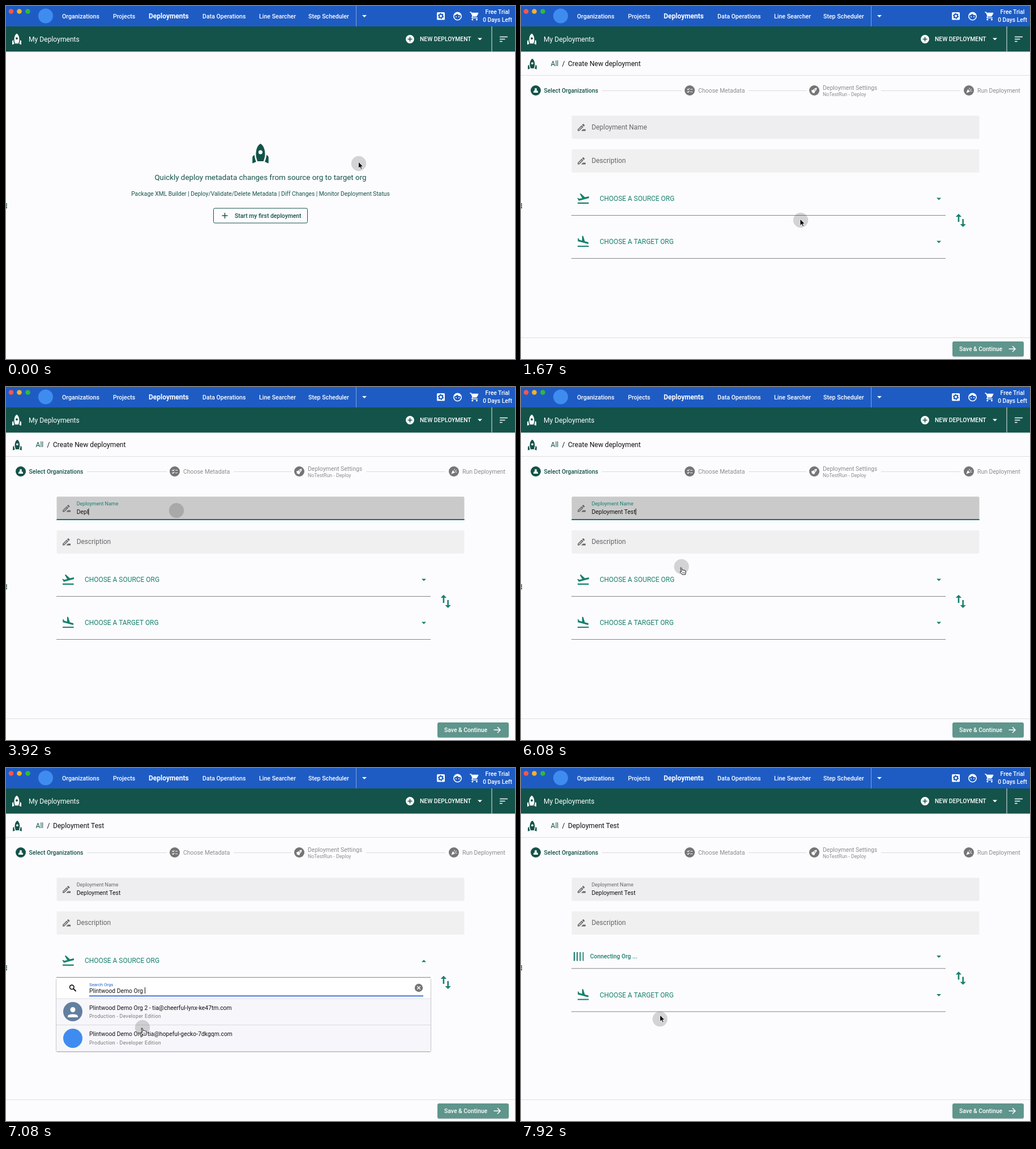
Write an HTML page that moves like this. It is 899 px wide and 623 px high and loops after 8 s.

```html
<!DOCTYPE html>
<html lang="en">
<head>
<meta charset="utf-8">
<title>My Deployments</title>
<style>
html, body { margin: 0; width: 100%; height: 100%; overflow: hidden; background: #fcfcfe; }
svg { display: block; width: 899px; height: 623px; }
text { font-family: Roboto, "Noto Sans", sans-serif; white-space: pre; }
</style>
</head>
<body>
<svg id="stage" viewBox="0 0 899 623" xmlns="http://www.w3.org/2000/svg"></svg>
<script>
const LOOP = 8000, TICK = 1000 / 12;
const DARK = '#14534a', GREEN = '#17806e', GREY = '#757575', PALE = '#8c8c8c', BLUE = '#1e5cc4', BADGE = '#3f8cf0';

// Markup helpers
const text = (x, y, str, size, fill, weight = 400, more = '') =>
  `<text x="${x}" y="${y}" font-size="${size}" fill="${fill}" font-weight="${weight}" ${more}>${str}</text>`;
const rect = (x, y, w, h, fill, more = '') =>
  `<rect x="${x}" y="${y}" width="${w}" height="${h}" fill="${fill}" ${more}/>`;
const dot = (x, y, r, fill, more = '') => `<circle cx="${x}" cy="${y}" r="${r}" fill="${fill}" ${more}/>`;
const stroke = (d, color, w = 1, more = '') =>
  `<path d="${d}" fill="none" stroke="${color}" stroke-width="${w}" ${more}/>`;
const icon = (d, x, y, s, fill) =>
  `<path d="${d}" transform="translate(${x} ${y}) scale(${s})" fill="${fill}"/>`;
const group = (id, body, more = '') => `<g id="${id}" ${more}>${body}</g>`;
const drop = (x, y, fill, id = '') =>
  `<path ${id && `id="${id}"`} d="M-4 -2H4L0 2Z" transform="translate(${x} ${y})" fill="${fill}"/>`;

const ROCKET = 'M12 2.5s4.5 2 4.5 10.5c0 2.5-1 5.6-1.6 7H9.100c-.6-1.400-1.600-4.500-1.600-7C7.500 4.500 12 2.500 12 2.500zm2 8.500a2 2 0 1 0-4 0 2 2 0 1 0 4 0zm-6.300 9.500c-.5-1.200-1.500-4.200-1.700-6.900l-1.100.8Q4 15 4 16.100V22zM20 22v-5.900Q20 15 19.100 14.400l-1.100-.8c-.2 2.700-1.200 5.700-1.700 6.900z';
const CART = 'M7 18a2 2 0 1 0 .01 0zM1 2v2h2l3.600 7.600-1.350 2.450C4.500 15.400 5.500 17 7 17h12v-2H7.400q-.3 0-.2-.4l.9-1.600h7.450q1.200 0 1.750-1L20.900 5.500Q21.300 4 20 4H5.200l-.9-2zm16 16a2 2 0 1 0 .01 0z';
const PEN = 'M15 16l-4 4h10v-4zM12.060 7.200L3 16.250V20h3.750l9.060-9.060zM5.900 18H5v-.9l7.060-7.060.9.9zM18.700 8q.6-.7 0-1.400l-2.300-2.300q-.7-.6-1.400 0l-1.850 1.800 3.750 3.750z';
const TAKEOFF = 'M2.500 19h19v2h-19zM22.070 9.640c-.2-.8-1-1.300-1.840-1.060L14.900 10 8 3.570l-1.900.5 4.140 7.170-5 1.340-1.970-1.540-1.450.4 2.600 4.480L21 11.500q1.300-.6 1.070-1.860z';
const LAND = 'M2.500 19h19v2h-19zM9.700 13.270l9.650 2.580c.8.2 1.600-.3 1.840-1.060.2-.8-.3-1.600-1.060-1.840l-5.300-1.420L12.060 2.500 10.120 2v8.280L5.150 8.950l-.93-2.320-1.450-.4v5.170z';
const SWAP = 'M16 17V10h-2v7h-3l4 4 4-4zM9 3L5 7h3v7h2V7h3z';

const person = (x, y, s) => dot(x, y - 3 * s, 3 * s, '#fff') +
  `<path d="M${x - 6 * s} ${y + 5 * s}q0 -4 ${6 * s} -4t${6 * s} 4v${s}h${-12 * s}z" fill="#fff"/>`;

const topBar = () => rect(0, 0, 899, 36, BLUE) +
  dot(9, 9.5, 4.3, '#fc5650') + dot(23.5, 9.5, 4.3, '#f6b02c') + dot(38.500, 9.5, 4.3, '#30b93c') +
  dot(70, 17.5, 13, BADGE) +
  text(99, 21.7, 'Organizations', 10.6, '#fff', 500) +
  text(189, 21.7, 'Projects', 10.6, '#fff', 500) +
  text(252, 21.7, 'Deployments', 12, '#fff', 700) +
  text(347, 21.7, 'Data Operations', 10.6, '#fff', 500) +
  text(447, 21.7, 'Line Searcher', 10.6, '#fff', 500) +
  text(534, 21.7, 'Step Scheduler', 10.6, '#fff', 500) +
  rect(618, 0, 1, 36, '#7fa3de') + drop(633, 18, '#fff') +
  rect(761, 11, 14, 13.500, '#fff', 'rx="1.6"') +
  dot(768, 17.7, 3.1, 'none', `stroke="${BLUE}" stroke-width="2"`) +
  dot(768, 17.7, 4.5, 'none', `stroke="${BLUE}" stroke-width="1.4" stroke-dasharray="2.2 2.51"`) +
  dot(797.5, 18, 6.7, 'none', 'stroke="#fff" stroke-width="1.6"') +
  `<path d="M791.500 16.500q4 -.5 5 -3q3 3.500 7.500 2.500q-1.500 -5 -6.500 -5t-6 5.500z" fill="#fff"/>` +
  dot(795, 19, 1, '#fff') + dot(800, 19, 1, '#fff') +
  icon(CART, 818.500, 8.8, .76, '#fff') +
  text(868, 14, 'Free Trial', 10.3, '#fff', 500, 'text-anchor="middle"') +
  text(868, 27.8, '0 Days Left', 10.3, '#fff', 500, 'text-anchor="middle"');

const subBar = () => rect(0, 36, 899, 44.5, DARK) +
  icon(ROCKET, 7, 46.3, 1, '#fff') +
  text(40, 62.8, 'My Deployments', 12.1, '#fff') +
  dot(713.5, 58.500, 7.4, '#fff') + stroke('M709.5 58.500h8M713.5 54.500v8', DARK, 1.6) +
  text(731, 62.2, 'NEW DEPLOYMENT', 10.3, '#fff', 500) +
  drop(837, 58.500, '#fff') + rect(857.500, 36, 1, 44.5, '#e4ecea') +
  stroke('M872 54.500h14M872 58.500h9.500M872 62.500h4.700', '#fff', 1.5);

const home = () => icon(ROCKET, 428.100, 238.500, 1.78, DARK) +
  text(449.5, 306.5, 'Quickly deploy metadata changes from source org to target org', 13.37, DARK, 400, 'text-anchor="middle"') +
  text(449.5, 334.6, 'Package XML Builder | Deploy/Validate/Delete Metadata | Diff Changes | Monitor Deployment Status',
    10.3, DARK, 400, 'text-anchor="middle"') +
  rect(366.5, 357, 166, 26, DARK, `id="startFill" rx="2.5"`) +
  rect(366.5, 357, 166, 26, 'none', `rx="2.5" stroke="${DARK}"`) +
  stroke('M381.500 370h10M386.5 365v10', DARK, 1.4) +
  text(404, 373.8, 'Start my first deployment', 10.37, DARK, 500);

const steps = () => dot(26, 149, 9, DARK) + person(26, 149, .68) +
  text(40.5, 153, 'Select Organizations', 10.34, DARK, 500) +
  rect(143, 149, 141, 1, '#d9d9db') + rect(402, 149, 102, 1, '#d9d9db') + rect(636, 149, 140, 1, '#d9d9db') +
  [298, 518, 791].map(x => dot(x, 149, 9, GREY)).join('') +
  stroke('M293.500 146.500l1.500 1.500 2.500 -2.500M293.500 151l1.500 1.500 2.500 -2.500M299 147h4M299 151.500h4', '#fff', 1.1) +
  `<path d="M522.500 144.500q-4 0 -6.500 3.500l-2.500 .5 -.8 1.500 4.300 4.300 1.500 -.8 .5 -2.500q3.500 -2.500 3.500 -6.500zM513.500 153.500l.5 -2 1.500 1.500z" fill="#fff"/>` +
  dot(519, 148, 1, GREY) +
  `<path d="M786.500 153.500l2.500 -6.500 4 4z" fill="#fff"/>` +
  stroke('M791 147.500q2 -1 1 -3M793 149l3 -3M793.500 150.500q1.500 -1.500 3 0', '#fff', 1) +
  text(313, 153, 'Choose Metadata', 10.44, PALE) +
  text(533, 147.900, 'Deployment Settings', 10.44, PALE) +
  text(533, 158.800, 'NoTestRun - Deploy', 8.78, PALE) +
  text(806, 153, 'Run Deployment', 10.44, PALE);

const form = () => icon(ROCKET, 8.3, 90.500, .97, DARK) +
  text(52.500, 105.600, 'All', 12.1, DARK) + text(72.500, 105.600, '/', 12.1, '#111') +
  text(83, 105.600, '', 12.1, '#111', 400, 'id="crumb"') +
  rect(0, 122, 899, 1, '#dfdfe1') + steps() +
  rect(89.5, 193.5, 720, 41, '#000', 'id="nameBg" rx="2"') +
  rect(89.5, 234, 720, 1, '#555', 'id="nameEdge"') +
  rect(89.5, 233, 720, 2, '#0f7666', 'id="nameLine"') +
  icon(PEN, 97.700, 205, .78, '#666') +
  text(0, 0, 'Deployment Name', 11.9, GREY, 400, 'id="label"') +
  text(124.700, 223.900, '', 10.42, '#111', 400, 'id="typed"') +
  rect(125, 214.500, 1, 11.500, '#111', 'id="caret"') +
  rect(89.5, 253, 720, 41, '#f0f0f1', 'rx="2"') +
  icon(PEN, 97.700, 264, .78, '#666') +
  text(124.700, 277.100, 'Description', 11.96, '#666') +
  group('sourceRow', icon(TAKEOFF, 97.5, 327.300, 1.03, GREEN) +
    text(139, 344.200, 'CHOOSE A SOURCE ORG', 11.96, GREEN) +
    rect(89, 369, 661, 1, '#858585') + drop(738, 340.500, GREEN, 'sourceDrop')) +
  group('busyRow', [0, 1, 2, 3].map(i => rect(93 + i * 5.2, 325, 2.2, 15.5, GREEN, 'class="bar"')).join('') +
    text(122, 336.200, 'Connecting Org ...', 10.37, GREEN, 500) +
    rect(89, 353.300, 661, 1, '#858585') + drop(738, 333, GREEN)) +
  group('targetRow', icon(LAND, 97.5, 403.400, 1.03, GREEN) +
    text(139, 420.200, 'CHOOSE A TARGET ORG', 11.96, GREEN) +
    rect(89, 445, 661, 1, '#858585') + drop(738, 416.500, GREEN)) +
  group('swap', icon(SWAP, 761.300, 363, 1.29, GREEN)) +
  rect(0, 585, 899, 1, '#dfdfe1') +
  rect(762, 592.800, 126, 27, '#000', 'rx="3" opacity=".16"') + rect(762, 592, 126, 26.500, '#5f958c', 'rx="3"') +
  text(774, 609.100, 'Save &amp; Continue', 10.4, '#fff', 500) +
  stroke('M861.500 605.300h11M868 600.300l5 5 -5 5', '#fff', 1.5);

const org = (y, name, mail) => text(147, y, `${name} - ${mail}`, 10.37, '#111') +
  text(147, y + 14.400, 'Production - Developer Edition', 8.85, '#777', 400, 'letter-spacing=".29"');

const menu = () => rect(88, 371, 663, 131, '#000', 'rx="3" opacity=".12"') +
  rect(88.500, 371, 662, 130, '#000', 'rx="3" opacity=".2"') +
  rect(89, 370, 661, 130, '#fff', 'rx="2"') + rect(89, 369, 661, 1, '#858585') +
  rect(89, 407, 661, 93, '#f7f7fb') +
  rect(89, 406.500, 661, 1, '#e0e0e4') + rect(89, 453, 661, 1, '#dadade') +
  dot(116.300, 386.800, 3.700, 'none', 'stroke="#111" stroke-width="1.6"') + stroke('M119 389.500l4.500 4.500', '#111', 1.9) +
  text(147, 384.900, 'Search Orgs', 7.83, '#1d5fd0') +
  text(147, 396.500, 'Plintwood Demo Org ', 10.37, '#111', 400, 'id="query"') +
  rect(246.500, 387, 1, 11, '#111', 'id="queryCaret"') +
  rect(147, 401.500, 590, 1.7, '#1d5fd0') +
  dot(729, 388, 7.2, GREY) + stroke('M726.200 385.200l5.600 5.600M731.800 385.200l-5.600 5.600', '#fff', 1.4) +
  dot(118, 430, 17, '#627f9f') + person(118, 431, 1.5) +
  org(426.700, 'Plintwood Demo Org 2', 'tia@cheerful-lynx-ke47tm.com') +
  dot(118, 477, 17, BADGE) +
  org(473.300, 'Plintwood Demo Org', 'tia@hopeful-gecko-7dkgqm.com');

const pointers = () => dot(0, 0, 13.200, '#000', 'id="halo" opacity=".16"') +
  group('arrow', `<path d="M0 0V11.500L2.700 9 4.600 13 6.500 12.200 4.700 8.400H8.200Z" fill="#000" stroke="#fff" stroke-width=".8"/>`) +
  group('hand', `<path d="M0 1.200Q.9 -.6 2 1.200L3.400 5.200Q4.600 4.300 5.500 5.400 6.700 4.700 7.500 5.900 9.200 5.500 9.400 7.500 9.800 10 8.700 13H3.200Q1.800 10.500 -.8 8.400 -.5 6.600 2 8Z" fill="#fff" stroke="#111" stroke-width="1"/>` +
    stroke('M4 8.500v2.500M5.700 8.500v2.500M7.300 8.500v2.500', '#111', .6)) +
  group('beam', stroke('M-2.300 -5.500Q0 -5.500 0 -4Q0 -5.500 2.300 -5.500M0 -4V4M-2.300 5.500Q0 5.500 0 4Q0 5.500 2.300 5.500M-1.300 1.500h2.600', '#111', 1.1));

const stage = document.getElementById('stage');
stage.innerHTML = rect(0, 0, 899, 623, '#fcfcfe') + group('home', home()) + group('form', form()) +
  [349.500, 352.700, 356].map(y => rect(0, y - 1, 1.800, 2, '#123a34')).join('') +
  topBar() + subBar() + group('menu', menu()) + pointers();

const el = {};
stage.querySelectorAll('[id]').forEach(n => el[n.id] = n);
const bars = [...stage.querySelectorAll('.bar')];
const set = (n, k, v) => n.setAttribute(k, v);
const show = (n, on) => set(n, 'display', on ? 'inline' : 'none');

const ease = p => { p = Math.min(1, Math.max(0, p)); return p * p * (3 - 2 * p); };
const ramp = (t, from, len) => ease((t - from) / len);

// Key points: time, x, y
const TIP = [[250, 622.5, 275], [830, 493, 376], [1750, 493, 376], [2330, 302, 218], [5830, 302, 218],
  [6080, 281.500, 318], [6250, 276, 338], [6670, 276, 338], [7080, 239, 458.500], [7330, 240, 470],
  [7580, 240, 470], [7920, 245.500, 436]];
const HALO = [[250, 623, 278], [830, 494, 378], [1750, 494, 378], [2400, 301, 218], [5830, 301, 218],
  [6080, 283.500, 317], [6330, 277, 338], [6670, 277, 338], [7080, 241, 458], [7400, 241, 470],
  [7580, 241, 470], [8000, 246, 440]];
const along = (keys, t) => {
  let i = keys.findIndex(k => k[0] > t);
  if (i < 0) i = keys.length;
  const a = keys[Math.max(0, i - 1)], b = keys[Math.min(keys.length - 1, i)];
  const p = b === a ? 0 : ease((t - a[0]) / (b[0] - a[0]));
  return [a[1] + (b[1] - a[1]) * p, a[2] + (b[2] - a[2]) * p];
};

const TYPED = 'Deployment Test';
const KEYS = [[3080, 1], [3500, 2], [3750, 3], [3920, 4], [4170, 6], [4500, 8], [4750, 9], [4830, 11], [5330, 13], [5580, 15]];

function drawForm(t) {
  const focus = ramp(t, 2365, 360), blur = ramp(t, 6290, 360);
  const hover = ramp(t, 2180, 220) * (1 - blur), lit = focus * (1 - blur);
  const active = t > 2365 && t < 6290;
  el.crumb.textContent = t < 6290 ? 'Create New deployment' : TYPED;
  set(el.nameBg, 'opacity', .055 + .08 * hover + .065 * lit);
  set(el.nameEdge, 'opacity', hover);
  set(el.nameLine, 'x', 449.5 - 360 * focus);
  set(el.nameLine, 'width', 720 * focus);
  set(el.nameLine, 'opacity', 1 - blur);
  set(el.label, 'transform', `translate(124.700 ${217.800 - 8.700 * focus}) scale(${1 - .245 * focus})`);
  set(el.label, 'fill', active ? GREEN : '#666');

  const count = KEYS.reduce((n, k) => t + 4 >= k[0] ? k[1] : n, 0);
  el.typed.textContent = TYPED.slice(0, count);
  show(el.caret, active);
  set(el.caret, 'x', 124.700 + (count ? el.typed.getComputedTextLength() : 0));

  const busy = t >= 7560;
  show(el.sourceRow, !busy);
  show(el.busyRow, busy);
  set(el.targetRow, 'transform', `translate(0 ${busy ? -15.500 : 0})`);
  set(el.swap, 'transform', `translate(0 ${busy ? -7.500 : 0})`);
  set(el.sourceDrop, 'transform', `translate(738 340.500) rotate(${180 * ramp(t, 6290, 300)})`);
  bars.forEach((b, i) => set(b, 'opacity', .8 + .2 * Math.cos((t - 7920) / 130 - i * .5)));
}

function drawPointer(t) {
  const tip = along(TIP, t), halo = along(HALO, t);
  const kind = t < 720 ? 'arrow' : t < 1240 ? 'hand' : t < 2240 ? 'arrow' : t < 3080 ? 'beam' :
    t < 5900 ? '' : t < 5960 ? 'beam' : t < 7560 ? 'hand' : 'arrow';
  for (const k of ['arrow', 'hand', 'beam']) {
    show(el[k], k === kind);
    set(el[k], 'transform', `translate(${tip})`);
  }
  set(el.halo, 'cx', halo[0]);
  set(el.halo, 'cy', halo[1]);
}

function draw(ms) {
  const t = Math.floor((ms % LOOP + 4) / TICK) * TICK;
  const page = ramp(t, 1160, 330);
  show(el.home, t < 1240);
  set(el.startFill, 'opacity', .12 * ramp(t, 680, 150) + .12 * ramp(t, 960, 200));
  show(el.form, t >= 1240);
  set(el.form, 'opacity', page);
  drawForm(t);
  const open = ramp(t, 6370, 250) * (1 - ramp(t, 7510, 160));
  show(el.menu, open > 0);
  set(el.menu, 'opacity', open);
  if (open > 0) set(el.queryCaret, 'x', 147.500 + el.query.getComputedTextLength());
  drawPointer(t);
}

const start = performance.now();
function loop() {
  draw(performance.now() - start);
  requestAnimationFrame(loop);
}
loop();
</script>
</body>
</html>
```
